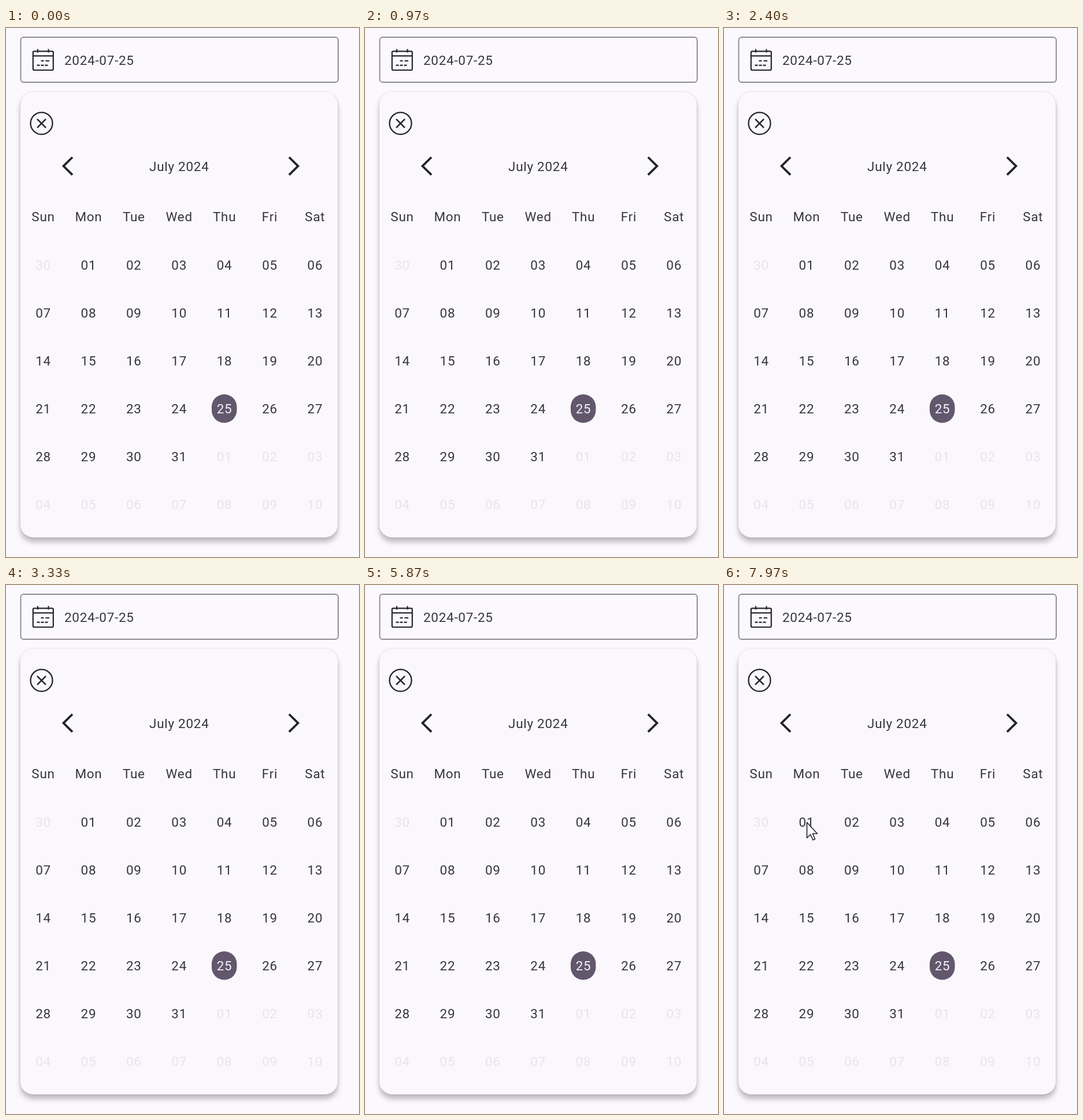
Write an HTML page that moves like this. It is 611 by 917 pixels and loops after 8 s.

```html
<!DOCTYPE html>
<html lang="en">
<head>
<meta charset="utf-8">
<title>Date picker</title>
<style>
  html, body { margin: 0; width: 100%; height: 100%; overflow: hidden; background: #fbf9fd; }
  svg { display: block; width: 611px; height: 917px; }
  text { font: 22.5px Roboto, sans-serif; letter-spacing: .7px; fill: #37363c; }
  .soft { filter: blur(.55px); }
  .centered { text-anchor: middle; }
  .outside { fill: #e9e2ee; }
  .selected { fill: #f6f2fa; }
  .line { fill: none; stroke: #242329; }
  .card { fill: #faf8fc; filter: drop-shadow(0 8px 5px rgba(30, 28, 40, .26)) drop-shadow(0 0 2px rgba(30, 28, 40, .12)); }
  #cursor { opacity: 0; }
</style>
</head>
<body>
<svg viewBox="0 0 611 917">
  <rect class="card" x="25" y="111" width="549" height="772" rx="22"/>
  <g class="soft">
    <rect x="25.5" y="16" width="549.5" height="78" rx="5" fill="none" stroke="#8e8b94" stroke-width="1.9"/>
    <g class="line" stroke-width="2.2">
      <rect x="46.8" y="40.3" width="35" height="32.7" rx="2"/>
      <path d="M46.8 48.3H81.8M55 36.5v6M73.5 36.5v6"/>
      <path d="M60.5 57h5M68.5 57h6.5M53.5 64.6h5M60.5 64.6h5M67.5 64.6h5"/>
    </g>
    <text x="101" y="64">2024-07-25</text>

    <g class="line" stroke-width="2.3">
      <circle cx="61.5" cy="165.3" r="19"/>
      <path d="M54 157.8l15 15M69 157.8l-15 15" stroke-width="2.6"/>
      <path d="M115 224L99.5 239.3L115 254.6M490 224L505.5 239.3L490 254.6" stroke-width="3.8"/>
    </g>
    <text class="centered" x="299.8" y="248">July 2024</text>
    <rect x="356" y="635" width="43.5" height="49.5" rx="21.7" fill="#62576d"/>
    <g id="days"></g>

    <path id="cursor" d="M143.5 411.5V438.5L149.5 432.5L154 442L157.5 440.5L153.5 431H161.5Z"
          fill="#fbfaff" stroke="#2c2b33" stroke-width="1.7" stroke-linejoin="round"/>
  </g>
</svg>
<script>
  const days = document.getElementById('days');

  function addLabel(text, column, y, kind = '') {
    const label = document.createElementNS('http://www.w3.org/2000/svg', 'text');
    label.setAttribute('class', 'centered ' + kind);
    label.setAttribute('x', 64.5 + column * 78.4);
    label.setAttribute('y', y);
    label.textContent = text;
    days.append(label);
  }

  ['Sun', 'Mon', 'Tue', 'Wed', 'Thu', 'Fri', 'Sat'].forEach((name, i) => addLabel(name, i, 335));

  for (let i = 0; i < 42; i++) {
    const date = new Date(2024, 5, 30 + i);
    const inMonth = date.getMonth() === 6;
    const kind = !inMonth ? 'outside' : date.getDate() === 25 ? 'selected' : '';
    addLabel(String(date.getDate()).padStart(2, '0'), i % 7, 418.7 + Math.floor(i / 7) * 83.1, kind);
  }

  // The pointer shows up only at the end of the loop.
  const LOOP = 8000, POINTER_IN = 7930;
  document.getElementById('cursor').animate([
    { opacity: 0, offset: 0, easing: 'step-end' },
    { opacity: 1, offset: POINTER_IN / LOOP },
    { opacity: 1, offset: 1 }
  ], { duration: LOOP, iterations: Infinity });
</script>
</body>
</html>
```
